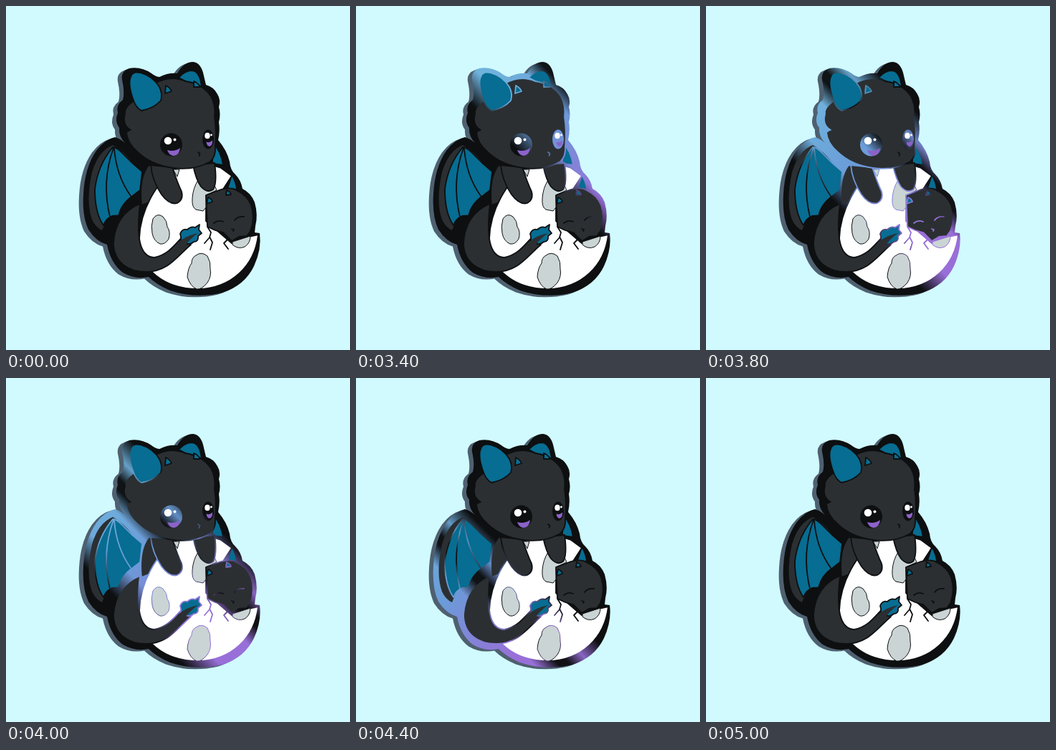
Recreate the animation shown at these times as an HTML page. Size 480x480 px, loop 5200 ms.

```html
<!DOCTYPE html>
<html lang="en">
<head>
<meta charset="utf-8">
<title>Dragon pin</title>
<style>
  html, body { margin: 0; width: 100%; height: 100%; overflow: hidden; background: #d1faff; }
  svg { display: block; width: 100vw; height: 100vh; }
  .metal { fill: url(#metal); }
  .line { fill: none; stroke: url(#metal); stroke-width: 1.8; stroke-linecap: round; stroke-linejoin: round; }
  .dark, .blue, .white, .spot { stroke: url(#metal); stroke-width: 1.8; stroke-linejoin: round; }
  .dark { fill: #2b2f32; }
  .blue { fill: #076d92; }
  .white { fill: #fff; }
  .spot { fill: #cad4d4; stroke-width: 1; }
  .bare { stroke: none; }
  .side { fill: #4f6070; }
</style>
</head>
<body>
<svg viewBox="0 0 480 480">
  <defs>
    <linearGradient id="tint" gradientUnits="userSpaceOnUse" x1="145" y1="145" x2="305" y2="305">
      <stop offset="0" stop-color="#6fb2dc"/>
      <stop offset=".45" stop-color="#6b9bd8"/>
      <stop offset="1" stop-color="#986fd8"/>
    </linearGradient>
    <!-- black everywhere except a narrow and a wide stripe of light -->
    <linearGradient id="shade" gradientUnits="userSpaceOnUse">
      <stop offset="0" stop-color="#0d0f10"/>
      <stop offset=".17" stop-color="#0d0f10" stop-opacity=".1"/>
      <stop offset=".29" stop-color="#0d0f10" stop-opacity=".97"/>
      <stop offset=".36" stop-color="#0d0f10" stop-opacity=".97"/>
      <stop offset=".5" stop-color="#0d0f10" stop-opacity="0"/>
      <stop offset=".78" stop-color="#0d0f10" stop-opacity="0"/>
      <stop offset="1" stop-color="#0d0f10"/>
    </linearGradient>
    <pattern id="metal" patternUnits="userSpaceOnUse" width="480" height="480">
      <rect width="480" height="480" fill="url(#tint)"/>
      <rect width="480" height="480" fill="url(#shade)"/>
    </pattern>
    <path id="outline" d="M162 103 Q160 91 172 87 Q188 84 203 94 Q209 99 215 99 Q225 93 239 94
      Q248 78 261 78 Q271 79 275 93 L279 110 Q290 113 295 123 Q300 131 297 141 Q300 151 297 162
      Q299 174 296 187 Q308 201 312 217 Q313 229 320 235 Q328 243 330 255 Q342 261 347 274
      Q352 292 348 307 L347 316 L354 317 Q357 339 346 363 Q333 390 302 400 Q264 409 229 397 Q210 389 199 378
      Q180 382 163 372 Q146 359 141 333 Q126 329 115 312 Q106 293 108 262 Q110 225 126 202
      Q138 186 152 183 Q159 185 166 191 Q157 182 158 170 Q151 161 156 149 Q153 138 163 131 Q166 121 162 103 Z"/>
  </defs>

  <rect width="480" height="480" fill="#d1faff"/>
  <use href="#outline" class="side" x="-6" y="2.4"/>
  <use href="#outline" class="side" x="-3" y="1.2"/>
  <use href="#outline" class="metal"/>

  <!-- wings -->
  <path class="dark bare" d="M149 194 Q129 202 120 232 Q111 273 120 298 Q125 309 134 313 L139 301 L185 232 Q170 206 149 194 Z"/>
  <path class="blue" d="M149 197 Q128 222 124 256 Q124 289 136 306 Q139 297 148 293 Q155 292 157 294
    Q160 276 178 264 L187 257 L190 231 Q176 220 163 206 Q155 197 149 197 Z"/>
  <path class="line" d="M150 198 Q133 245 145 294 M151 199 Q154 237 174 265"/>
  <path class="metal" d="M146 311 Q139 306 142 298 Q150 290 159 292 Q161 276 186 260 L187 285 Z"/>
  <path class="blue" d="M288 190 Q300 202 303 222 L288 220 Z M315 236 Q321 245 322 256 L309 255 Z"/>

  <!-- body and egg -->
  <path class="dark" d="M199 222 Q185 240 189 278 L240 258 L246 228 Z"/>
  <path class="white" d="M239 226 C210 244 187 286 186 325 C185 369 223 395 268 395 C314 394 347 363 352 319
    L338 322 L315 331 L279 300 L279 264 L302 257 L315 237 L300 226 L287 222 Z"/>
  <path class="spot" d="M205 297 Q211 288 219 294 Q225 300 225 308 Q230 315 227 325 Q222 333 215 332 Q206 328 204 317 Q202 307 205 297 Z
    M268 243 Q261 254 260 268 Q259 281 265 284 L275 286 L279 281 L279 264 L294 257 L289 246 Z
    M265 348 Q273 342 281 349 Q286 357 285 367 Q287 377 281 386 Q273 396 266 395 Q257 391 253 378 Q254 365 259 359 Q259 351 265 348 Z
    M316 329 L341 321 Q341 331 333 336 Q324 340 316 333 Z
    M233 228 L242 228 L239 238 Z"/>
  <path class="dark" d="M187 276 C163 286 152 304 150 330 C150 357 170 371 196 371 C227 370 238 350 258 333
    L250 319 C238 328 230 346 207 351 C185 350 182 319 187 276 Z"/>
  <path class="blue" d="M241 331 Q246 326 243 318 Q246 310 253 312 Q258 307 264 309 L270 305 L269 312 L273 317
    L268 321 Q269 329 262 329 Q257 334 251 331 Q246 335 241 331 Z"/>
  <path class="dark bare" d="M239 331 Q251 320 268 317 Q257 324 246 339 Z"/>
  <path class="line" d="M281 308 L286 316 L284 323 L277 331 M284 322 L288 330 L285 340
    M302 317 L309 326 L304 331 L310 339"/>

  <!-- arms -->
  <path class="dark" d="M202 222 Q204 244 217 263 Q228 278 239 275 Q248 270 245 259 Q239 246 232 225 Z"/>
  <path class="dark" d="M261 222 Q265 242 272 252 Q281 262 289 256 Q295 247 291 219 Z"/>

  <!-- head and ears -->
  <path class="blue" d="M241 100 Q249 90 260 90 Q272 92 273 116 L257 108 Z"/>
  <path class="dark" d="M208 108 Q229 96 250 105 Q274 108 286 126 Q293 139 291 155 Q294 174 292 196
    Q293 210 285 217 Q263 230 233 226 Q203 222 184 204 Q169 191 168 176 L173 173 Q162 165 166 151 Q164 143 176 134 Z"/>
  <path class="line" d="M165 164 Q169 171 174 173"/>
  <path class="blue" d="M174 99 Q176 91 187 93 Q205 98 214 113 Q219 123 216 132 Q206 143 189 146 Q181 142 177 129 Q170 109 174 99 Z"/>
  <path class="blue" d="M223 111 Q229 114 231 119 L222 122 Z M262 105 Q268 107 271 113 L262 113 Z"/>
  <path class="line" d="M268 204 L270.500 206 L269.500 209"/>

  <!-- eyes -->
  <ellipse class="metal" cx="230.500" cy="193.500" rx="15.500" ry="16"/>
  <path fill="#8c62c9" d="M225 201 Q235 204 243 198 Q242 208 234 209 Q227 208 225 201 Z"/>
  <circle fill="#fff" cx="226" cy="188" r="5.300"/>
  <circle fill="#fff" cx="235.500" cy="186.500" r="2"/>
  <ellipse class="metal" cx="282" cy="186" rx="8" ry="13.500"/>
  <path fill="#8c62c9" d="M279.500 189.500 Q284 191.500 288 187.500 Q288.500 195 284 196 Q280 195 279.500 189.500 Z"/>
  <ellipse fill="#fff" cx="281" cy="181" rx="3.700" ry="4.300"/>
  <circle fill="#fff" cx="286.500" cy="180" r="1.400"/>

  <!-- hatchling -->
  <path class="dark" d="M279 264 L300 256 Q315 252 323 258 Q336 264 342 278 Q348 296 341 314 L336 321 L325 322
    L315 328 L303 316 L292 313 L281 308 Z"/>
  <path class="blue" d="M282 267 Q287 269 288 273 L280 276 Z M308 257 Q313 259 314 263 L307 264 Z"/>
  <path class="line" d="M290 303 Q296 298 303 301 M319 299 Q323 293 332 294 M315 311 L318 312 L317 314"/>
</svg>
<script>
  const LOOP = 5200, SHINE_START = 3000, STEP = 100;
  const shade = document.getElementById('shade');

  // Places a gradient end on the diagonal where y - x equals u.
  function setEnd(n, u) {
    shade.setAttribute('x' + n, -u / 2);
    shade.setAttribute('y' + n, u / 2);
  }

  function render(time) {
    const t = Math.floor((time % LOOP) / STEP) * STEP;
    const centre = t < SHINE_START ? -600 : 12 + (t - 4200) * 0.295;
    setEnd(1, centre - 40);
    setEnd(2, centre + 200);
  }

  const start = performance.now();
  function tick() {
    render(performance.now() - start);
    requestAnimationFrame(tick);
  }
  tick();
</script>
</body>
</html>
```
